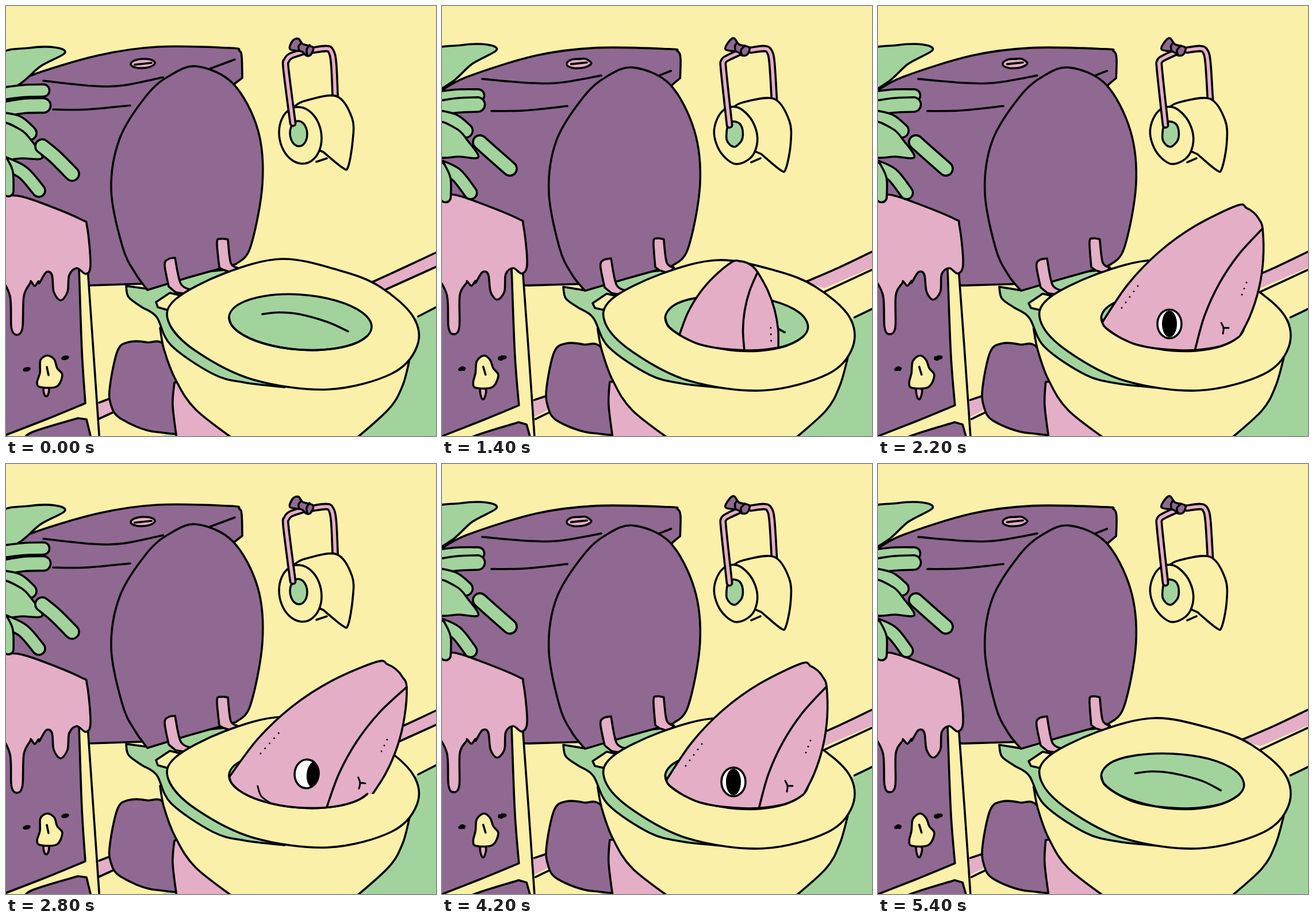
Animation of 748x748 px, one loop 5600 ms. Source, as an HTML page with a canvas:

```html
<!DOCTYPE html>
<html lang="en">
<head>
<meta charset="utf-8">
<title>Bathroom visitor</title>
<style>
html, body { margin: 0; width: 100%; height: 100%; overflow: hidden; background: #fbf0a9; }
canvas { display: block; width: 748px; height: 748px; }
</style>
</head>
<body>
<canvas id="stage" width="748" height="748"></canvas>
<script>
const ctx = document.getElementById('stage').getContext('2d');
const INK = '#000', YELLOW = '#fbf0a9', PURPLE = '#8f6991', PINK = '#e4aec6', GREEN = '#a2d39d';
const STEP = 200, COUNT = 28, LINE = 3.6;

const parse = s => s.trim().split(/\s+/).map(p => p.split(',').map(Number));
const mix = (a, b, k) => a + (b - a) * k;

function spline(path, pts, loop) {
  const n = pts.length;
  const at = i => loop ? pts[(i + n) % n] : pts[Math.max(0, Math.min(n - 1, i))];
  for (let i = 0; i < (loop ? n : n - 1); i++) {
    const a = at(i - 1), b = at(i), c = at(i + 1), d = at(i + 2);
    path.bezierCurveTo(b[0] + (c[0] - a[0]) / 6, b[1] + (c[1] - a[1]) / 6,
      c[0] - (d[0] - b[0]) / 6, c[1] - (d[1] - b[1]) / 6, c[0], c[1]);
  }
}

function open(pts) {
  const path = new Path2D();
  path.moveTo(...pts[0]);
  spline(path, pts, false);
  return path;
}

// Smooth runs of points; the point before a slash is a corner.
function toPath(text, closed, move = p => p) {
  const path = new Path2D(), runs = text.split('/').map(s => parse(s).map(move));
  path.moveTo(...runs[0][0]);
  if (runs.length === 1) {
    spline(path, runs[0], closed);
  } else {
    runs.forEach((run, i) => spline(path, i ? [runs[i - 1].at(-1), ...run] : run, false));
  }
  if (closed) path.closePath();
  return path;
}

// Points along a sheared ellipse, as text
function arc(x, y, rx, ry, shear = 0, from = 0, to = Math.PI * 11 / 6) {
  return Array.from({ length: 12 }, (_, i) => {
    const t = mix(from, to, i / 11), c = Math.cos(t);
    return `${x + rx * c},${y + shear * c + ry * Math.sin(t)}`;
  }).join(' ');
}

// A hanging drop, walked from right to left
const drip = (x, top, tip, r) =>
  `${x + r},${top} ${x + r * .8},${tip - r} ${x},${tip} ${x - r * .8},${tip - r} ${x - r},${top}`;

// The second drawing is the first one nudged, with a slightly shaky hand.
function part(kind, color, text, dx = 0, dy = 0, width = 0) {
  const closed = kind === 'shape' || kind === 'fill';
  const nudge = ([x, y]) => [x + dx + Math.sin(x * 13 + y * 7), y + dy + Math.sin(x * 5 + y * 11)];
  return { kind, color, width, paths: [toPath(text, closed), toPath(text, closed, nudge)] };
}
const shape = (...p) => part('shape', ...p);
const fill = (...p) => part('fill', ...p);
const line = (...p) => part('line', INK, ...p);
const rod = (color, width, text, dx, dy) => part('rod', color, text, dx, dy, width);
const leaf = (...p) => rod(GREEN, ...p);

const room = [
  // floor and skirting
  fill(GREEN, '716,540/748,523/748,760/235,760/300,738/600,640', 0, 2),
  line('717,540 752,522', 0, 2),
  fill(PINK, '631,483/748,429/748,454/663,492', 3, -1),
  line('631,483 690,456 752,427', 2, -2),
  line('661,493 752,452', 6, 3),
  fill(PINK, '160,690/190,680/190,704/160,718', -1, -3),
  line('162,690 188,680', -1, -4),
  line('162,718 188,706', 0, 1),

  // foot
  shape(PURPLE, '282,598 245,585 212,585 194,600 181,660 182,692 200,718 262,741 340,730', 2, 3),
  shape(PINK, '480,620/293,655/290,695 298,760/560,760', -1, 0),

  // tank
  shape(PURPLE, '-10,150/40,122 160,86 264,71 390,73 406,78 410,88 411,125/398,135/300,300/240,483/147,486/-10,480', 4, 1),
  line('65,130 150,139 205,138 273,124', 4, -4),
  line('82,180 140,180 216,173', 3, 2),
  line('355,109 398,93', 0, 20),
  shape(PINK, arc(238, 100, 21, 8, -1)),
  line('224,102 253,99', 0, 0),

  // bowl and rim
  shape(YELLOW, '500,560/268,560/275,598 295,650 330,702 405,760/600,760/665,702 690,660 703,610', 2, 2),
  shape(GREEN, '209,487/213,506 235,523 262,541 287,590 360,640 415,655 485,663/420,455/320,465/246,492', 2, 2),

  // lid and hinges
  shape(PURPLE, '246,494/225,465 203,420 183,320 198,230 245,155 285,121 332,105 395,135 438,215 446,310 425,420 400,449/318,472', 2, 2),
  shape(PINK, '283,488/276,450 283,440 294,438/304,483 323,494/312,500 295,498', -1, 2),
  shape(PINK, '371,455/367,411 374,405 386,406/391,447 404,456/394,463 378,459', 0, 0),

  // seat
  shape(YELLOW, '285,499/261,515/264,524/285,530/330,510', 2, 1),
  shape(YELLOW, '480,440 380,465 295,510 283,550 330,600 430,650 560,667 670,640 715,592 708,540 650,488 580,460', 0, 1),

  // paper
  rod(PINK, 11, '573,166 570,100 565,78 556,74 533,77', 5, 0),
  shape(YELLOW, '520,240/500,176/520,165 575,157 602,195 603,235 595,280 585,281 552,254', 3, 4),
  line('540,271 558,265', -3, 0),
  shape(YELLOW, arc(512, 225, 37, 49, 5), -1, 0),
  shape(GREEN, arc(509, 222, 15, 22, 1)),
  rod(PINK, 11, '499,204 487,110 488,95 495,87 515,80', 2, 2),
  shape(PURPLE, '494,75 499,60 509,57 516,66 534,72 530,85 522,86 514,79', 0, 0),
  line('514,64 509,70 510,78'),
  line('528,68 523,76 524,86', -2, 0),

  // cabinet
  shape(YELLOW, '-10,400/142,455/152,600 163,760/-10,760', -1, 0),
  shape(PURPLE, '-10,400/127,455/132,600 138,691/70,719 -10,750', -5, 4),
  shape(PURPLE, '30,760/44,742 125,717/140,719/150,760', 8, 8),
  shape(PINK, '-10,331/20,330 60,342 130,371 141,384 147,450 139,466 123,456 ' +
    drip(95, 468, 512, 15) + ' 70,463 ' + drip(50, 482, 487, 8) + ' ' + drip(19, 505, 572, 12) + ' -10,470', 1, -1),

  // face on the drawer
  shape(PINK, arc(70, 666, 5, 13), 1, 5),
  shape(YELLOW, '72,608 60,616 59,638 54,655 60,663 88,662 98,642 89,630 84,615', 0, 1),
  line('71,628 74,642', 1, 0),
  shape(INK, arc(36, 632, 5, 2, -1), -1, -1),
  shape(INK, arc(103, 612, 5, 2, -1), 2, 0),

  // plant
  shape(GREEN, '-10,85 40,73 85,72 102,82 60,105 25,135 -10,148', -8, -4),
  leaf(23, '-10,153 30,148 65,147', -3, 8),
  leaf(27, '-10,181 30,174 65,173', -4, -1),
  leaf(26, '-10,197 20,203 41,221', 0, -4),
  shape(GREEN, '-10,205 25,215 45,235 63,264 30,265 -10,262', 0, -2),
  leaf(26, '63,244 85,262 115,292', 2, -8),
  leaf(24, '-2,274 30,290 57,321', -7, 3),
  leaf(20, '-6,270 3,290 4,322', 2, 11)
];

const hole = [512, 550, 124, 48, 8];
const water = line('446,536 475,533 510,536 560,550 595,566', 2, 1);
const basin = shape(GREEN, arc(...hole), 1, 1);
const rim = arc(...hole, Math.PI, .35);
const rimLine = line(rim, 1, 1);
const front = toPath(rim + '/748,574/748,0/0,0/0,550', true);

// Pose: left foot, tip, shoulder, right foot, ridge foot, eye, glance
const low = parse('413,572 505,445 549,463 585,600 526,600 476,678 0,0');
const mid = parse('400,572 545,377 592,403 602,600 539,600 487,609 0,0');
const lean = parse('389,552 625,347 669,387 622,588 551,600 507,553 0,0');
const tall = parse('388,545 645,344 697,388 631,584 557,600 523,539 13,0');
const deep = low.map(([x, y], i) => [x, i < 6 ? y + 160 : y]);
const poses = [[0, deep], [3, deep], [7, low], [9, mid], [11, lean], [13, tall],
  [19, tall], [21, lean], [23, mid], [24, low], [27, deep], [28, deep]];

function poseAt(step) {
  const i = poses.findIndex(([t]) => t > step);
  const [t0, a] = poses[i - 1], [t1, b] = poses[i];
  const k = (step - t0) / (t1 - t0);
  return a.map(([x, y], j) => [mix(x, b[j][0], k), mix(y, b[j][1], k)]);
}

// Points on a bowed line from a to b, without b
function bow(a, b, bend) {
  const dx = b[0] - a[0], dy = b[1] - a[1];
  return [0, .25, .5, .75].map(k => {
    const h = bend * 4 * k * (1 - k);
    return [a[0] + dx * k + dy * h, a[1] + dy * k - dx * h];
  });
}

function ink(path, width = LINE) {
  ctx.strokeStyle = INK;
  ctx.lineWidth = width;
  ctx.stroke(path);
}

function disc(x, y, rx, ry, color) {
  const path = new Path2D();
  path.ellipse(x, y, rx, ry, 0, 0, Math.PI * 2);
  ctx.fillStyle = color;
  ctx.fill(path);
  return path;
}

function dots(n, x, y, dx, dy) {
  for (let i = 0; i < n; i++) disc(x + dx * i, y + dy * i, 1.5, 1.5, INK);
}

// The face turns around the eye.
function drawFace([x, y], turn, glance) {
  ctx.save();
  ctx.translate(x, y);
  ctx.rotate(turn);
  dots(5, -55, -66, -7, 9.5);
  dots(3, 134, -72, -4, 10.5);
  ink(open(parse('-83,29 -75,46 -57,57')), 3);
  ink(open(parse('90,-2 94,7 93,17')), 3);
  ink(open(parse('94,7 103,7')), 3);
  const eye = disc(0, 0, 21, 25, '#fff');
  ctx.save();
  ctx.clip(eye);
  disc(glance, 0, 13, 23, INK);
  ctx.restore();
  ink(eye);
  ctx.restore();
}

function drawHead([left, tip, shoulder, right, ridge, eye, glance]) {
  ctx.save();
  ctx.clip(front);
  const body = open([...bow(left, tip, .09), ...bow(tip, shoulder, .17), ...bow(shoulder, right, .085), right]);
  const skin = new Path2D(body);
  skin.lineTo(right[0], 800);
  skin.lineTo(left[0], 800);
  ctx.fillStyle = PINK;
  ctx.fill(skin);
  ink(body);
  ink(open([...bow(shoulder, ridge, -.08), ridge]));
  drawFace(eye, (shoulder[0] - ridge[0] - 118) / 240, glance[0]);
  ctx.restore();
}

function drawPart({ kind, color, width, paths }, look) {
  const path = paths[look];
  if (kind === 'rod') {
    ink(path, width + LINE / 2);
    ctx.strokeStyle = color;
    ctx.lineWidth = width - LINE * 1.5;
    ctx.stroke(path);
    return;
  }
  ctx.fillStyle = color;
  if (kind !== 'line') ctx.fill(path);
  if (kind !== 'fill') ink(path);
}

function draw(step) {
  const look = step % 2;
  ctx.fillStyle = YELLOW;
  ctx.fillRect(0, 0, 748, 748);
  for (const item of [...room, basin, water]) drawPart(item, look);
  drawHead(poseAt(step));
  drawPart(rimLine, look);
}

ctx.lineCap = ctx.lineJoin = 'round';
const start = performance.now();
let shown = -1;
function tick() {
  const step = Math.floor((performance.now() - start) / STEP) % COUNT;
  if (step !== shown) draw(shown = step);
  requestAnimationFrame(tick);
}
tick();
</script>
</body>
</html>
```
